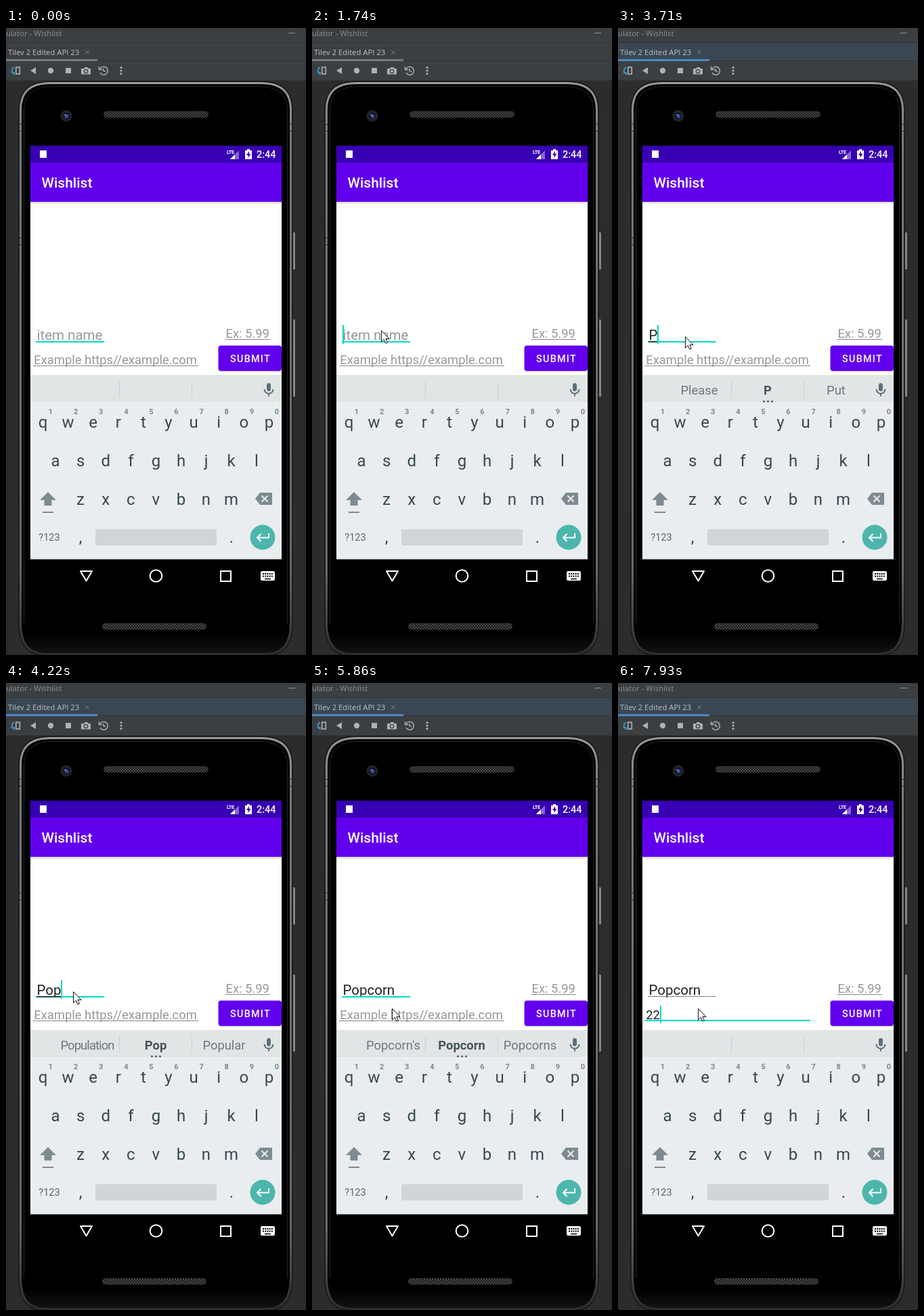
Write an HTML page that moves like this. It is 443x927 px and loops after 8000 ms.

```html
<!DOCTYPE html>
<html lang="en">
<head>
<meta charset="utf-8">
<title>Wishlist</title>
<style>
  html, body { margin: 0; width: 100%; height: 100%; overflow: hidden; background: #2b2c2e; }
  svg { display: block; width: 443px; height: 927px; font-family: Roboto, sans-serif; }
  .ide { font-family: "Open Sans", "Noto Sans", sans-serif; }
  .mid { text-anchor: middle; }
  .keys { font-size: 24px; fill: #37474f; text-anchor: middle; }
  .digits { font-size: 11px; font-weight: 700; fill: #7b888e; text-anchor: middle; }
  .hint { fill: #979797; }
  .suggest { font-size: 18.4px; fill: #6c787d; text-anchor: middle; }
  .suggest .main { fill: #45545b; }
  .long { letter-spacing: -.9px; }
</style>
</head>
<body>
<svg viewBox="0 0 443 927">
  <defs>
    <linearGradient id="rim" gradientUnits="userSpaceOnUse" x1="0" y1="80" x2="0" y2="927">
      <stop offset="0" stop-color="#9a9c9d"/><stop offset=".1" stop-color="#777979"/>
      <stop offset=".85" stop-color="#686a6a"/><stop offset="1" stop-color="#2c2d2e"/>
    </linearGradient>
    <linearGradient id="chin" gradientUnits="userSpaceOnUse" x1="0" y1="895" x2="0" y2="927">
      <stop offset="0" stop-color="#000"/><stop offset="1" stop-color="#141415"/>
    </linearGradient>
    <pattern id="mesh" width="4" height="4" patternUnits="userSpaceOnUse">
      <rect width="4" height="4" fill="#151515"/>
      <path d="M0 0l4 4M4 0L0 4" stroke="#5a5a5a" stroke-width=".8"/>
    </pattern>
    <linearGradient id="shade" x2="0" y2="1">
      <stop offset="0" stop-color="#d6d6d6"/><stop offset="1" stop-color="#fff"/>
    </linearGradient>
    <path id="body" d="M21.500 140V122C21.500 94 36 81.500 66 81.500H376C406 81.500 420.500 94 420.500 122V880C420.500 908 410 925.500 384 925.500H58C32 925.500 21.500 908 21.500 880Z"/>
  </defs>

  <!-- Emulator window -->
  <g class="ide">
    <rect width="443" height="78" fill="#3c3f41"/>
    <rect id="tabs" y="22" width="443" height="26"/>
    <path d="M0 21.5H443M0 48.5H443M0 77.5H443" stroke="#313335"/>
    <rect id="tabLine" y="46" width="135" height="3"/>
    <text x="0" y="12" font-size="11.4" fill="#8d9092">ulator - Wishlist</text>
    <text x="3" y="40" font-size="11.3" fill="#bfc1c3">Tilev 2 Edited API 23</text>
    <path d="M117 33l6 6m0-6l-6 6" stroke="#777b7e"/>
    <path d="M417 7.5h10" stroke="#8f9294"/>
  </g>
  <g fill="#afb1b3">
    <path d="M12 58a6 6 0 0 0-2 9" fill="none" stroke="#3592c4" stroke-width="2"/>
    <path d="M7 65h6v5z" fill="#3592c4"/>
    <rect x="14.8" y="58" width="5.5" height="10" fill="none" stroke="#afb1b3" stroke-width="1.6"/>
    <path d="M44 58v10l-8-5z"/>
    <circle cx="66" cy="63" r="4.2"/>
    <rect x="88" y="59" width="8" height="8"/>
    <path d="M111 60h4l1.5-2h4l1.5 2h3v8.500h-14z"/>
    <circle cx="118" cy="64" r="2.7" fill="none" stroke="#3c3f41" stroke-width="1.3"/>
    <path d="M139 60.500a6 6 0 1 1 0 5.500M137.500 57v4.500h4.500M144 60v3.500l3 1" fill="none" stroke="#afb1b3" stroke-width="1.5"/>
    <circle cx="170" cy="58.500" r="1.6"/><circle cx="170" cy="63" r="1.6"/><circle cx="170" cy="67.500" r="1.6"/>
  </g>

  <!-- Phone -->
  <g fill="#858788" stroke="#242526">
    <rect x="422.500" y="301.500" width="5" height="56" rx="2"/>
    <rect x="422.500" y="430.500" width="5" height="115" rx="2"/>
  </g>
  <use href="#body" stroke="#1c1d1e" stroke-width="7"/>
  <use href="#body" fill="url(#chin)" stroke="url(#rim)" stroke-width="3"/>
  <path d="M18 142.500h7M18 152.500h7M18 310.500h7M18 320.500h7M417 142.500h7M417 152.500h7" stroke="#252627"/>
  <path d="M26.500 880V124C26.500 99 39 86.500 70 86.500H372C403 86.500 415.500 99 415.500 124V880" fill="none" stroke="#252627"/>
  <circle cx="89" cy="130" r="8.500" fill="#222326"/>
  <circle cx="89" cy="130" r="5" fill="#11152a"/>
  <circle cx="89.500" cy="130.500" r="2.700" fill="#31529f"/>
  <circle cx="87.500" cy="128.500" r="1" fill="#a8b9e0"/>
  <rect x="144.500" y="123.500" width="154" height="8.500" rx="4" fill="url(#mesh)" stroke="#343434"/>
  <rect x="142.500" y="880.500" width="153" height="8.500" rx="4" fill="url(#mesh)" stroke="#343434"/>

  <!-- App -->
  <rect x="36" y="174" width="371" height="340" fill="#fff"/>
  <rect x="36" y="174" width="371" height="25" fill="#3700b3"/>
  <rect x="36" y="199" width="371" height="58" fill="#6200ee"/>
  <rect x="36" y="257" width="371" height="4" fill="url(#shade)"/>
  <g fill="#fff">
    <rect x="50" y="181" width="10" height="11"/>
    <text x="326" y="186" font-size="7.500" font-weight="700" letter-spacing="-.5">LTE</text>
    <path d="M344 181v13h-13z" opacity=".4"/><path d="M338 187v7h-7z"/>
    <path d="M356 179h4v2h3v13h-10v-13h3z"/>
    <path d="M359 182l-4 6h2.500v4l4-6H359z" fill="#3700b3"/>
    <text x="370" y="192" font-size="14.400" font-weight="500">2:44</text>
    <text x="52.500" y="236" font-size="21" font-weight="500">Wishlist</text>
  </g>
  <rect x="314" y="471" width="93" height="37.500" rx="4" fill="#d4d4d4"/>
  <rect x="313.500" y="469.500" width="93.500" height="37.500" rx="4" fill="#6200ee"/>
  <text x="361" y="494" class="mid" font-size="14.300" font-weight="500" letter-spacing="1.300" fill="#fff">SUBMIT</text>
  <text x="324.500" y="457.500" font-size="18.400" class="hint">Ex: 5.99</text>
  <path d="M324 460.500h66" stroke="#858585"/>
  <text id="nameText" x="45.500" y="461" font-size="20.500"/>
  <rect id="nameLine" x="44" width="101"/>
  <rect id="compose" x="45" y="463" height="1.500" fill="#212121"/>
  <text id="linkText" x="41.200" y="497" font-size="18.400"/>
  <rect id="linkLine" x="40" width="244"/>
  <rect id="caret" width="2" fill="#03dac5"/>

  <!-- Keyboard -->
  <rect x="36" y="513" width="371" height="42" fill="#e1e5e6"/>
  <rect x="36" y="555" width="371" height="230.500" fill="#e9edf0"/>
  <path d="M36 554.500h371" stroke="#f5f7f8"/>
  <path d="M167.500 522v25M274.500 522v25" stroke="#cacfd1"/>
  <g class="suggest">
    <text id="s0" x="120" y="542"/><text id="s1" x="221" y="542" class="main"/><text id="s2" x="322" y="542"/>
    <path id="dots" d="M215.500 552h0m6 0h0m6 0h0" stroke="#45545b" stroke-width="3" stroke-linecap="round"/>
  </g>
  <rect x="385" y="525" width="6" height="12" rx="3" fill="#5f6f76"/>
  <path d="M381.500 534a6.500 6.500 0 0 0 13 0M388 540v4.500" fill="none" stroke="#5f6f76" stroke-width="2"/>
  <g id="keys" class="keys"></g>
  <g id="digits" class="digits"></g>
  <path d="M62 686l12 12h-6.500v8h-11v-8H50zM54 715h16v2H54z" fill="#7d8b91"/>
  <path d="M375 687h18v18h-18l-7-9z" fill="#7d8b91"/>
  <path d="M377.500 691.500l9 9m0-9l-9 9" stroke="#e9edf0" stroke-width="2"/>
  <text x="64" y="758" class="mid" font-size="14.500" fill="#57676e">?123</text>
  <rect x="132" y="741" width="179" height="24" rx="3" fill="#d0d5d8"/>
  <circle cx="379" cy="753" r="18.500" fill="#4db6ac"/>
  <path d="M388 747v6.500h-17m5.500-5.500l-5.500 5.500 5.500 5.500" fill="none" stroke="#fff" stroke-width="2"/>

  <!-- Navigation -->
  <g fill="none" stroke="#fff" stroke-width="2">
    <path d="M110 803h17l-8.500 14.500z" stroke-linejoin="round"/>
    <circle cx="221.500" cy="810" r="8.800"/>
    <rect x="317" y="803" width="15" height="15"/>
  </g>
  <rect x="376" y="803" width="21" height="14" rx="2" fill="#fff"/>
  <path d="M379 807h16M379 810.500h16" stroke="#000" stroke-width="2" stroke-dasharray="2 1.200"/>
  <path d="M382 814.500h9" stroke="#000" stroke-width="1.600"/>

  <path id="mouse" d="M.5.500v16.500l3.800-3.600 2.600 5.800 2.500-1.100-2.500-5.600h5.100z" fill="#fff" stroke="#111"/>
</svg>
<script>
const LOOP = 8000;
const $ = id => document.getElementById(id);
const set = (id, attrs) => Object.entries(attrs).forEach(([k, v]) => $(id).setAttribute(k, v));

const label = (x, y, s) => `<text x="${x}" y="${y}">${s}</text>`;
const row = (letters, x, y) => [...letters].map((c, i) => label(x + 37.1 * i, y, c)).join("");
$("keys").innerHTML = row("qwertyuiop", 54.5, 591) + row("asdfghjkl", 73, 648) +
  row("zxcvbnm", 110, 705) + label(110, 761, ",") + label(333, 761, ".");
$("digits").innerHTML = row("1234567890", 66, 571);

const start = { mouse: null, caret: false, active: false, field: "name", name: "", link: "",
  words: ["", "", ""], bold: false, compose: false };

// Each step overrides part of the state from its time on.
const steps = [
  [250, { mouse: [352, 890], caret: true }],
  [390, { mouse: [341, 765] }],
  [520, { mouse: [319, 607] }],
  [800, { mouse: [255, 552], caret: false }],
  [940, { mouse: [172, 492] }],
  [1070, { mouse: [124, 459] }],
  [1200, { mouse: [107, 450] }],
  [1340, { mouse: [102, 447], caret: true }],
  [1890, { active: true, caret: false }],
  [2420, { caret: true }],
  [2560, { mouse: [101, 452] }],
  [2700, { mouse: [99, 456] }],
  [2840, { caret: false }],
  [3430, { caret: true }],
  [3560, { name: "P", compose: true }],
  [3690, { words: ["Please", "P", "Put"], bold: true }],
  [3820, { name: "Po" }],
  [3960, { words: ["Point", "Po", "Poor"] }],
  [4090, { name: "Pop" }],
  [4220, { words: ["Population", "Pop", "Popular"] }],
  [4740, { name: "Popc", compose: false }],
  [4880, { name: "Popco", words: ["Popcorn", "Popc", "Pop"], bold: false }],
  [5020, { name: "Popcor", words: ["Popcorn", "Popco", "Popcorns"] }],
  [5160, { name: "Popcorn", words: ["Popcorn", "Popcor", "Popcorns"] }],
  [5310, { words: ["Popcorn's", "Popcorn", "Popcorns"], bold: true }],
  [5590, { mouse: [104, 463] }],
  [5720, { mouse: [113, 475], caret: false }],
  [5860, { mouse: [118, 481] }],
  [6170, { field: "link", words: ["", "", ""] }],
  [6320, { caret: true }],
  [6820, { caret: false }],
  [7380, { caret: true }],
  [7780, { link: "2" }],
  [7930, { link: "22" }]
];

const fields = {
  name: { x: 46, line: 463, blurred: 463, caretY: 439, caretH: 28, hint: "item name" },
  link: { x: 42, line: 498, blurred: 499, caretY: 477, caretH: 26, hint: "Example https//example.com" }
};

function drawField(key, state) {
  const f = fields[key], value = state[key], focused = state.field === key;
  const text = $(key + "Text");
  text.textContent = value || f.hint;
  text.setAttribute("fill", value ? "#212121" : "#979797");
  set(key + "Line", focused
    ? { y: f.line, height: 2, fill: "#03dac5" }
    : { y: f.blurred, height: 1, fill: "#858585" });
  const width = value ? text.getComputedTextLength() : 0;
  if (focused) set("caret", { x: Math.round(f.x + width - 1), y: f.caretY, height: f.caretH });
  if (key === "name") set("compose", { width: state.compose ? width : 0 });
}

function draw(t) {
  const state = { ...start };
  for (const [at, change] of steps) if (at <= t) Object.assign(state, change);
  set("tabs", { fill: state.active ? "#3b4653" : "#3c3f41" });
  set("tabLine", { fill: state.active ? "#4a88c7" : "#747a80" });
  drawField("name", state);
  drawField("link", state);
  set("caret", { visibility: state.caret ? "visible" : "hidden" });
  state.words.forEach((word, i) => {
    $("s" + i).textContent = word;
    $("s" + i).classList.toggle("long", word.length > 9);
  });
  set("s1", { "font-weight": state.bold ? 700 : 400 });
  set("dots", { visibility: state.words[1] ? "visible" : "hidden" });
  set("mouse", { visibility: state.mouse ? "visible" : "hidden",
    transform: `translate(${state.mouse || [0, 0]})` });
}

const begin = performance.now();
function tick() {
  draw((performance.now() - begin) % LOOP);
  requestAnimationFrame(tick);
}
tick();
</script>
</body>
</html>
```
